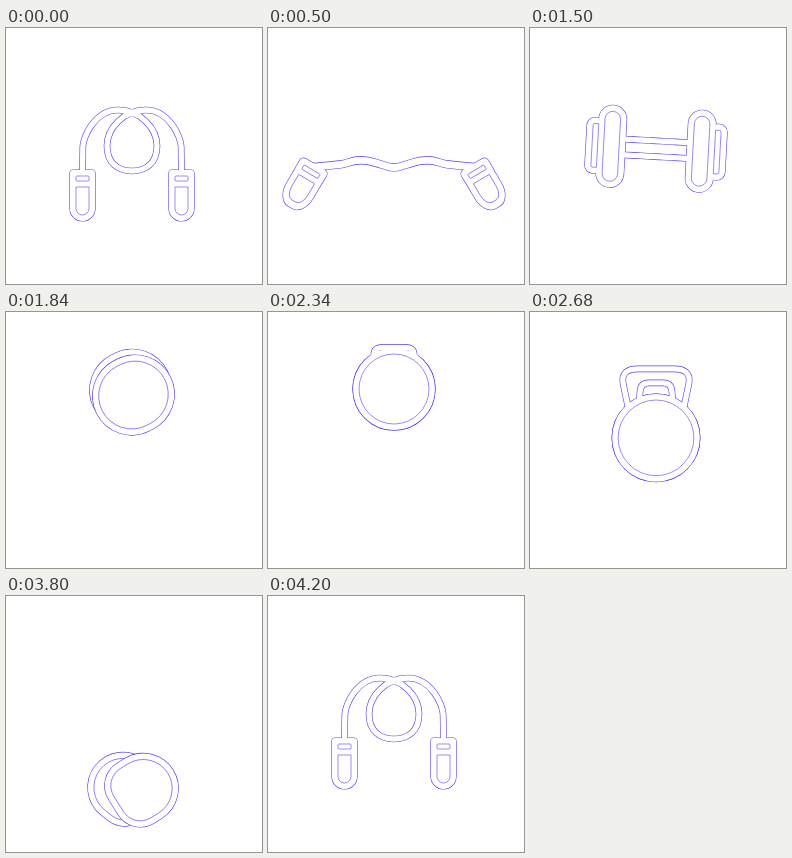
These frames come from a looping animation (256 by 256 pixels, 4.22 s). An HTML page:

```html
<!DOCTYPE html>
<html lang="en">
<head>
<meta charset="utf-8">
<title>Workout gear</title>
<style>
  html, body { margin: 0; width: 100%; height: 100%; overflow: hidden; background: #fff; }
  svg { display: block; width: 100%; height: 100%; }
  .ink, .edge, .tube { fill: none; stroke: #5443ea; }
  .ink { stroke-width: .6; }
  .edge { stroke-width: 1.2; }
  .body { fill: #fff; }
  .core { fill: none; stroke: #fff; }
</style>
</head>
<body>
<svg viewBox="0 0 256 256">
  <g id="gear">
    <path id="ropeTube" class="tube" stroke-width="6.6"/>
    <path id="bowTube" class="tube"/>
    <g id="left"><path class="edge"/><path class="body"/><path class="ink"/></g>
    <g id="right"><path class="edge"/><path class="body"/></g>
    <path id="ropeCore" class="core" stroke-width="5.4"/>
    <path id="bowCore" class="core"/>
    <path id="rightHoles" class="ink"/>
  </g>
</svg>
<script>
const LOOP = 4220, CX = 126, RIM = 6;
const $ = id => document.getElementById(id);
const all = selector => document.querySelectorAll(selector);
const lerp = (a, b, u) => a + (b - a) * u;
const blend = (a, b, u) =>
  Object.fromEntries(Object.keys(a).map(key => [key, lerp(a[key], b[key], u)]));
const span = (t, from, to) => Math.min(1, Math.max(0, (t - from) / (to - from)));
const ease = (u, power = 3) =>
  u < .5 ? (2 * u) ** power / 2 : 1 - (2 - 2 * u) ** power / 2;
const windUp = u => u * u * (1.6 * u - .6);
const arc = u => Math.sin(Math.PI * u);

// Poses of the left end; the right one mirrors it. An end is a collar (len, h, r)
// joined to an outer body with its own length, height and corner radii.
const grip = { x: 76.5, y: 142, angle: 90, len: 17, h: 12.5, r: 3,
  outLen: 51, outH: 12.5, farU: 12.5, farV: 12.5, near: 0, rim: RIM };
const strap = { x: 62, y: 125.5, angle: 180, len: 17, h: 21, r: 7,
  outLen: 47, outH: 20.5, farU: 32, farV: 14, near: 0, rim: 9.5 };
const weight = { x: 93, y: 122, angle: 180, len: 26, h: 41, r: 13,
  outLen: 38, outH: 28.5, farU: 8, farV: 8, near: 0, rim: RIM };
const disc = (r, y) => ({ x: CX + r, y, angle: 180, len: 2 * r, h: r, r,
  outLen: 2 * r - 3, outH: 5, farU: 2, farV: 2, near: 0, rim: RIM });
const ball = (r, y) => ({ x: CX + r, y, angle: 180, len: RIM, h: 4, r: 3,
  outLen: 2 * r, outH: r, farU: r, farV: r, near: r, rim: RIM });
const pouch = { ...ball(35, 212), x: 144.7, angle: 215, near: 26 };

const steps = [
  [280, 800, strap],
  [800, 1160, weight],
  [1420, 1960, disc(41, 77)],
  [2400, 2820, disc(44.5, 137)],
  [3000, 3001, ball(44.5, 137)],
  [3540, 3800, pouch],
  [3800, 4200, grip]
];

function endPose(t) {
  let pose = grip;
  for (const [from, to, next] of steps)
    if (t > from) pose = blend(pose, next, ease(span(t, from, to), 2.4));
  const fling = arc(span(t, 280, 800)) + arc(span(t, 3800, 4200));
  return { ...pose, x: pose.x - 25 * fling };
}

// Rounded box lying along the x axis, with separate near and far corners.
function box(u0, u1, h, near, farU, farV) {
  const len = u1 - u0;
  if (len < .6 || h < .6) return '';
  near = Math.max(0, Math.min(near, h, len / 2));
  farU = Math.max(0, Math.min(farU, len - near));
  farV = Math.max(0, Math.min(farV, h));
  return `M${u0 + near} ${-h}H${u1 - farU}A${farU} ${farV} 0 0 1 ${u1} ${farV - h}` +
    `V${h - farV}A${farU} ${farV} 0 0 1 ${u1 - farU} ${h}H${u0 + near}` +
    `A${near} ${near} 0 0 1 ${u0} ${h - near}V${near - h}A${near} ${near} 0 0 1 ${u0 + near} ${-h}Z`;
}

function endPaths({ len, h, r, outLen, outH, farU, farV, near, rim }) {
  const slotR = Math.max(r - RIM, 1);
  return {
    outline: box(0, len, h, r, r, r) +
      box(Math.max(len - RIM, 0), outLen, outH, near, farU, farV),
    holes: box(RIM, len - RIM, h - RIM, slotR, slotR, slotR) +
      box(len, outLen - rim, outH - RIM, near - RIM, farU - rim, farV - RIM)
  };
}

// Half of the looped rope: a stem, an arch and one side of the loop.
const strand = [[77, 142], [77, 134], [77, 127], [77, 118], [89, 82], [112, 82],
                [151, 101], [151, 118], [140, 143], [CX, 143]];
const commands = 'MC  S S S ';

function ropePath({ x, y, angle }, coil, gap) {
  const a = angle * Math.PI / 180;
  const startX = x + 3 * Math.cos(a), startY = y + 3 * Math.sin(a);
  const half = (shift, flip) => strand.map(([px, py], i) => {
    const pull = Math.max(0, 1 - i / 4);
    const along = lerp(startX, CX, i / (strand.length - 1));
    const qx = lerp(along, px + (startX - strand[0][0]) * pull, coil);
    const qy = lerp(startY, py + (startY - strand[0][1]) * pull, coil);
    return commands[i] + (flip ? 2 * CX - qx : qx) + ' ' + (qy + shift);
  }).join(' ');
  return [gap, -gap].map(s => half(s, false) + half(s, true)).join('');
}

// Kettlebell handle around the ball's centre.
const bow = 'M-28-31L-33-55Q-35-69-18-69H18Q35-69 33-55L28-31' +
  'M-16.5-38L-16-46Q-15.5-55-7-55H7Q15.5-55 16-46L16.5-38';
for (const id of ['bowTube', 'bowCore']) $(id).setAttribute('d', bow);

function draw(t) {
  const pose = endPose(t), { x, y, angle } = pose;
  const coil = 1 - ease(span(t, 280, 600)) + ease(span(t, 3800, 4200));
  const gap = 2 * span(t, 280, 800) + 6 * ease(span(t, 800, 1160)) - 8 * ease(span(t, 1420, 1960));
  const tilt = t < 1960 ? 70 * ease(span(t, 1420, 1960), 2) : 3 * arc(span(t, 3540, 4060));
  const grow = .5 + .5 * ease(span(t, 2200, 2640), 2) - .5 * windUp(span(t, 3000, 3500));

  const place = `translate(${x} ${y}) rotate(${angle})`;
  const mirrored = `translate(${2 * CX} 0) scale(-1 1) ${place}`;
  $('gear').setAttribute('transform', `rotate(${tilt} ${CX} ${y})`);
  $('left').setAttribute('transform', place);
  for (const id of ['right', 'rightHoles']) $(id).setAttribute('transform', mirrored);

  const { outline, holes } = endPaths(pose);
  for (const path of all('.edge, .body')) path.setAttribute('d', outline);
  for (const path of all('.ink')) path.setAttribute('d', holes);

  const rope = ropePath(pose, coil, gap);
  for (const id of ['ropeTube', 'ropeCore']) $(id).setAttribute('d', rope);

  for (const [id, width] of [['bowTube', 6.6], ['bowCore', 5.4]]) {
    $(id).setAttribute('visibility', grow > .5 ? 'visible' : 'hidden');
    $(id).setAttribute('transform', `translate(${CX} ${y}) scale(${grow})`);
    $(id).setAttribute('stroke-width', width / grow);
  }
}

function tick() {
  draw(performance.now() % LOOP);
  requestAnimationFrame(tick);
}
tick();
</script>
</body>
</html>
```
